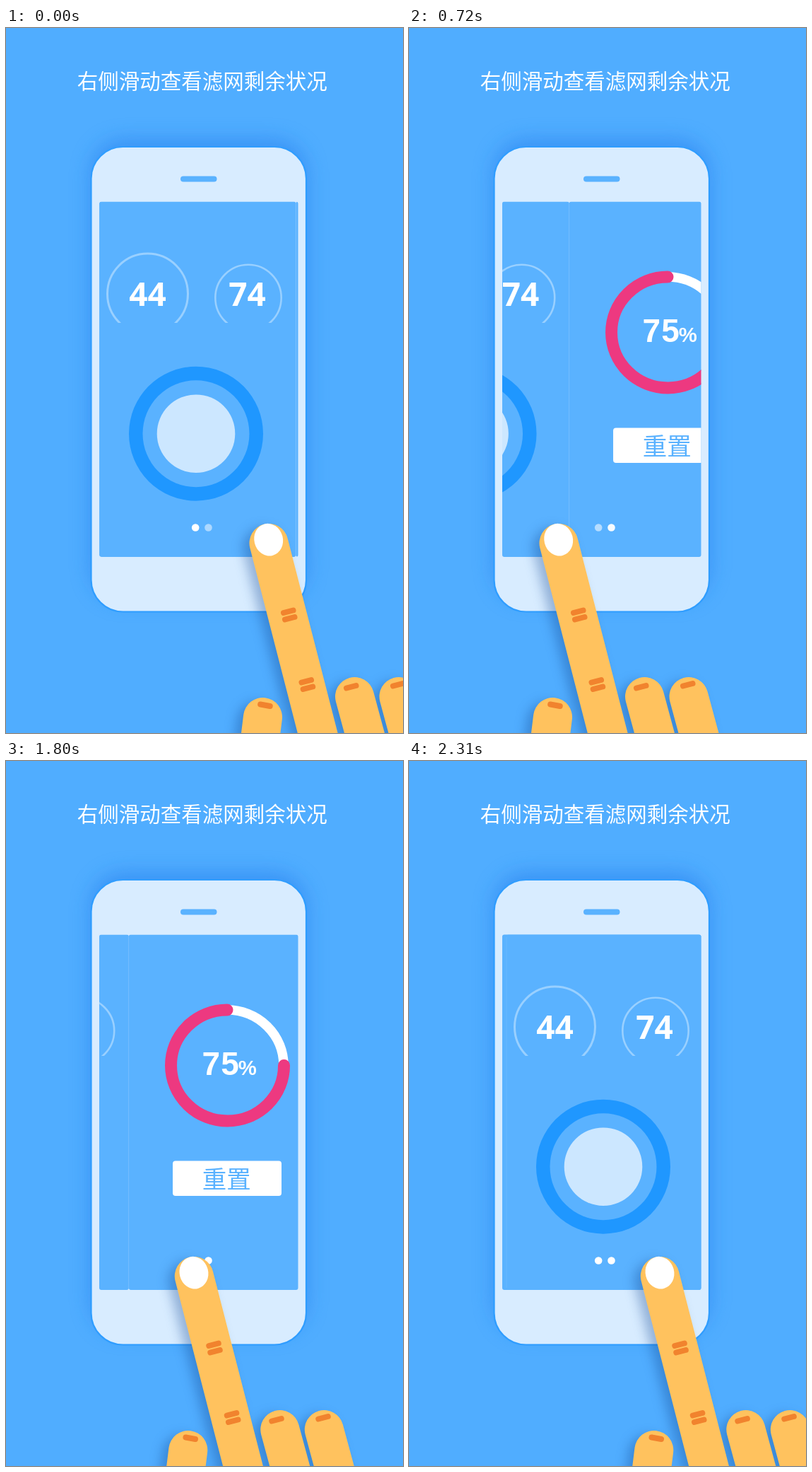
Write an HTML page that moves like this. It is 562x997 px and loops after 2.34 s.

```html
<!DOCTYPE html>
<html lang="zh">
<head>
<meta charset="utf-8">
<style>
  html, body { margin: 0; height: 100%; overflow: hidden; background: #50adff; }
  svg { display: block; width: 100vw; height: 100vh; }
  .cjk { font-family: "Noto Sans CJK SC", "Noto Sans CJK", sans-serif; font-weight: 300; }
  .count { font: 700 46px "Open Sans", "Noto Sans", sans-serif; text-anchor: middle; fill: #fff; }
  .percent { font: 700 46px "Liberation Sans", Arial, sans-serif; letter-spacing: 1.2px; fill: #fff; }
  .screen { fill: #5ab2ff; }
  .seam { stroke: #fff; stroke-opacity: .08; }
  .arc { fill: none; stroke: #fff; stroke-opacity: .38; }
  #hand { filter: drop-shadow(-9px 6px 8px rgba(15, 65, 140, .35)); }
  .skin { stroke: #ffc25e; stroke-width: 55; stroke-linecap: round; }
  .crease { stroke: #f1832e; stroke-width: 8; stroke-linecap: round; fill: none; }
</style>
</head>
<body>
<svg viewBox="0 0 562 997" preserveAspectRatio="none">
  <defs>
    <clipPath id="view"><rect x="132" y="245.5" width="281.5" height="502.5" rx="3"/></clipPath>
    <clipPath id="cut"><rect x="132" y="300" width="280" height="117"/></clipPath>
    <filter id="blur" x="-30%" y="-30%" width="160%" height="160%"><feGaussianBlur stdDeviation="15"/></filter>
  </defs>

  <text class="cjk" x="100.8" y="86.3" font-size="29.5" fill="#fff">右侧滑动查看滤网剩余状况</text>

  <rect x="121" y="159" width="304" height="650" rx="46" fill="#2378eb" opacity=".55" filter="url(#blur)"/>
  <rect x="120.5" y="168" width="304.5" height="657.5" rx="45" fill="#d8ecff" stroke="#2f9dff" stroke-width="2.2"/>
  <rect class="screen" x="247" y="209.5" width="51.5" height="8" rx="4"/>

  <g clip-path="url(#view)">
    <rect id="base" class="screen" x="132" y="245" width="282" height="503"/>
    <g id="pages">
      <rect class="screen" x="132" y="245.5" width="278.3" height="502.5" rx="3"/>
      <rect class="screen" x="410.3" y="245.5" width="300" height="502.5" rx="3"/>
      <path class="seam" d="M132 249V745M410.3 249V745"/>

      <g clip-path="url(#cut)">
        <circle class="arc" cx="200.5" cy="376" r="57" stroke-width="3"/>
        <circle class="arc" cx="343" cy="381.5" r="46.7" stroke-width="2.6"/>
      </g>
      <text class="count" x="200.5" y="392.5">44</text>
      <text class="count" x="341.5" y="392.5">74</text>
      <circle cx="269" cy="573.7" r="95" fill="#1f97ff"/>
      <circle class="screen" cx="269" cy="573.7" r="75.5"/>
      <circle cx="269" cy="573.7" r="55.3" fill="#cce7ff"/>

      <g transform="translate(265)" fill="none">
        <ellipse cx="284.5" cy="430.5" rx="80" ry="78.5" stroke="#fff" stroke-width="13.5"/>
        <path d="M365 430.5A80 78.5 0 1 1 284.5 352" stroke="#ed3980" stroke-width="17" stroke-linecap="round"/>
        <text class="percent" x="249" y="443.5">75<tspan x="300.3" font-size="29.3">%</tspan></text>
        <rect x="207.5" y="565.5" width="154" height="49.5" rx="4" fill="#fff"/>
        <text class="cjk screen" x="249.2" y="604" font-size="34.5">重置</text>
      </g>
    </g>
    <circle id="dot1" cx="268.2" cy="706.5" r="5.3" fill="#fff"/>
    <circle id="dot2" cx="286.5" cy="706.5" r="5.3" fill="#fff"/>
  </g>

  <g id="hand">
    <path class="skin" d="M363.5 974.5L356 1035M493.5 945.5L518 1036M556 945.5L580.5 1036M372 728.5L451.5 1037"/>
    <ellipse cx="371.7" cy="723.7" rx="20.3" ry="23" fill="#fff" transform="rotate(-14.5 371.7 723.7)"/>
    <path class="crease" d="M393 827l13.5-3.5M395 836.5l13.5-3.5M418.5 925.5l13.5-3.5M420.7 935l13.5-3.5
      M360.2 956.5l13.5 2.5M482 933.5l13.5-3.5M548 930.5l13.5-3.5"/>
  </g>
</svg>
<script>
  const LOOP = 2340, STEP = 30;
  const start = performance.now();
  const $ = id => document.getElementById(id);
  const ramp = (t, a, b) => Math.min(1, Math.max(0, (t - a) / (b - a)));
  const move = (id, x) => $(id).setAttribute('transform', `translate(${x})`);

  function draw() {
    const t = Math.floor((performance.now() - start) % LOOP / STEP) * STEP;
    const swipe = ramp(t, 0, 810);
    const pageX = -265 * ramp(t, 180, 960) + 271 * ramp(t, 1740, 2310);
    move('hand', -180 * swipe + 163.3 * ramp(t, 1503, 2156));
    move('pages', pageX);
    $('base').style.display = pageX > 0 ? '' : 'none';
    $('dot1').style.opacity = 1 - .5 * swipe + .5 * ramp(t, 1500, 2310);
    $('dot2').style.opacity = .5 + .5 * swipe;
    requestAnimationFrame(draw);
  }
  draw();
</script>
</body>
</html>
```
